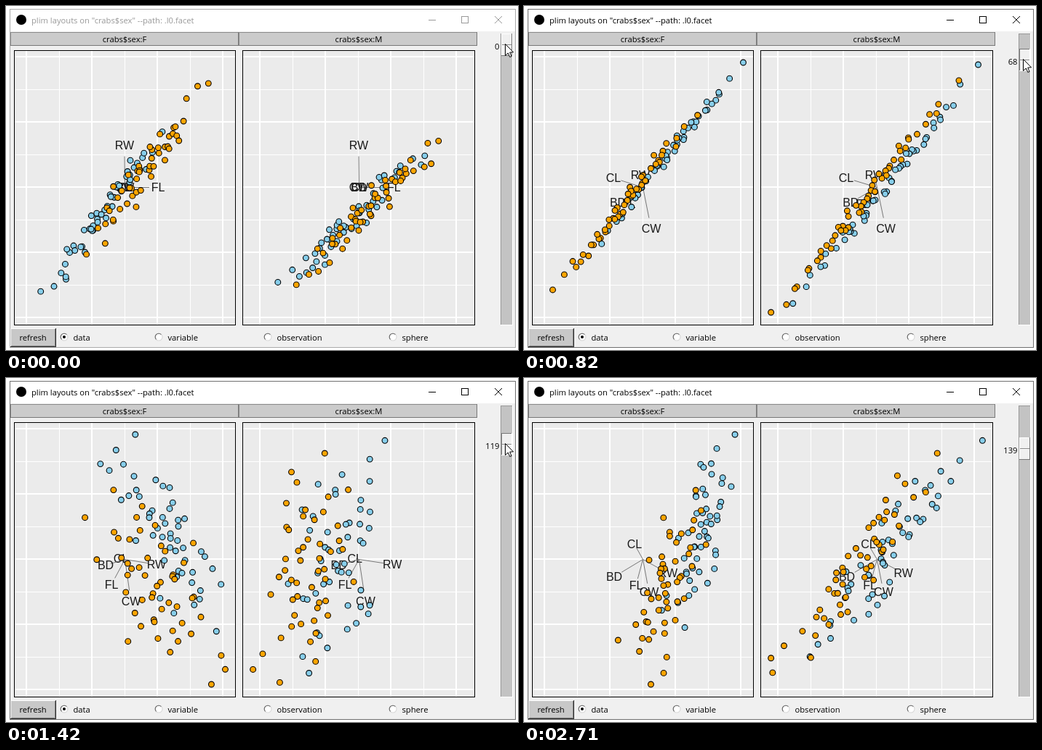
These frames come from a looping animation (704x475 px, 3.11 s). An HTML page with a canvas:

```html
<!DOCTYPE html>
<html lang="en">
<head>
<meta charset="utf-8">
<title>Scatterplot tour</title>
<style>
html, body { margin: 0; width: 100%; height: 100%; overflow: hidden; background: #fff; }
canvas { display: block; width: 704px; height: 475px; }
</style>
</head>
<body>
<canvas id="stage" width="704" height="475"></canvas>
<script>
const ctx = document.getElementById('stage').getContext('2d');
const LOOP = 3110;
const UI_FONT = '11.2px "Open Sans", sans-serif';
const AXIS_FONT = '16px "Liberation Sans", Arial, sans-serif';
const BLUE = '#87ceeb', ORANGE = '#ffa500';

// The screen refreshes only at these moments; the drag runs through a few key points
const TICKS = [0, 120, 240, 360, 510, 670, 820, 940, 1060, 1180, 1300, 1420, 1540,
  1820, 1940, 2060, 2180, 2300, 2440, 2560, 2710];
const DRAG = [[120, 0], [360, 19], [510, 50], [820, 68], [1300, 101], [1420, 119], [1820, 126], [2300, 139]];
const CURSOR_EXIT = [[2300, 677, 311], [2560, 699, 468]];

// Tour of projections: slider value, then the x, y label offset of each variable.
// The same vectors project the measurements.
const VARIABLES = ['FL', 'RW', 'CL', 'CW', 'BD'];
const TOUR = [
  [0, 46, 0, 0, -58, 0, 0, 0, 0, 0, 0],
  [19, 43, 4, -3, -61, -24, -12, -5, 17, -24, 25],
  [68, -19, 23, -3, -17, -40, -13, 12, 57, -34, 21],
  [84, -30, 26, 13, -1, -31, -4, 17, 62, -29, 11],
  [119, -18, 35, 44, 7, -5, -1, 9, 58, -26, 8],
  [139, -9, 36, 35, 19, -11, -21, 9, 45, -39, 24]
];

// Crab measurements in mm: mean per species, growth per unit of size, individual variation
const VARIATION = [0.35, 0.5, 0.4, 0.4, 0.3];
const PANELS = [
  { title: 'crabs$sex:F', x: 11, width: 305, headX: 6, headWidth: 314,
    centre: 163, gridCentre: 163, stretch: 1, growth: [2.75, 2.3, 5.85, 6.6, 2.6],
    means: { [BLUE]: [13.3, 12.1, 28.1, 32.6, 11.8], [ORANGE]: [17.6, 14.8, 34.6, 39, 15.6] } },
  { title: 'crabs$sex:M', x: 325, width: 320, headX: 320, headWidth: 328,
    centre: 485, gridCentre: 484, stretch: 1.05, growth: [3.3, 2.05, 7.5, 8.3, 3.3],
    means: { [BLUE]: [14.8, 11.7, 32, 36.8, 13.4], [ORANGE]: [16.6, 12.3, 33.7, 37.2, 15.3] } }
];

let seed = 11;
const random = () => (seed = (seed * 1664525 + 1013904223) % 4294967296) / 4294967296;
const bell = () => (random() + random() + random() - 1.5) * 2;
const crabs = PANELS.flatMap(panel => Object.entries(panel.means).flatMap(([color, mean]) =>
  Array.from({ length: 50 }, (_, i) => {
    const p = (i + 0.5) / 50;
    const size = 3.15 * (p ** 0.25 - (1 - p) ** 0.25); // bell-shaped quantile with short tails
    const sizes = mean.map((m, j) => m + panel.growth[j] * size + VARIATION[j] * bell());
    return { panel, color, sizes };
  })));

const extent = list => [Math.min(...list), Math.max(...list)];

// Bring every variable to the range 0..1
VARIABLES.forEach((_, j) => {
  const [low, high] = extent(crabs.map(crab => crab.sizes[j]));
  crabs.forEach(crab => crab.sizes[j] = (crab.sizes[j] - low) / (high - low));
});

// Linear interpolation between rows whose first entry is the key
function along(rows, key) {
  const i = Math.max(1, rows.findIndex(row => row[0] >= key));
  const [a, b] = key > rows.at(-1)[0] ? [rows.at(-1), rows.at(-1)] : [rows[i - 1], rows[i]];
  const k = a === b ? 0 : Math.max(0, (key - a[0]) / (b[0] - a[0]));
  return a.slice(1).map((n, j) => n + (b[j + 1] - n) * k);
}

// Both panels share one scale, fitted to the widest spread of the projected points
function project(offsets, zoom) {
  const raw = axis => crabs.map(({ sizes }) =>
    sizes.reduce((sum, s, j) => sum + s * offsets[2 * j + axis], 0));
  const fit = (list, span) => {
    const [low, high] = extent(list);
    return list.map(n => ((n - low) / (high - low) - 0.5) * span * zoom);
  };
  const xs = fit(raw(0), 305), ys = fit(raw(1), 380);
  return crabs.map(({ panel, color }, i) =>
    ({ panel, color, x: panel.centre + xs[i] * panel.stretch, y: 250.5 + ys[i] }));
}

function rect(x, y, w, h, color) {
  ctx.fillStyle = color;
  ctx.fillRect(x, y, w, h);
}

function line(color, width, ...points) {
  ctx.beginPath();
  points.forEach(([x, y]) => ctx.lineTo(x, y));
  ctx.strokeStyle = color;
  ctx.lineWidth = width;
  ctx.stroke();
}

function text(str, x, y, align = 'left', color = '#000', font = UI_FONT) {
  ctx.font = font;
  ctx.textAlign = align;
  ctx.fillStyle = color;
  ctx.fillText(str, x, y);
}

function disc(x, y, r, fill, stroke) {
  ctx.beginPath();
  ctx.arc(x, y, r, 0, 7);
  ctx.fillStyle = fill;
  ctx.fill();
  if (!stroke) return;
  ctx.strokeStyle = stroke;
  ctx.lineWidth = 1.1;
  ctx.stroke();
}

function bevel(x, y, w, h, fill, topLeft, bottomRight) {
  rect(x, y, w, h, bottomRight);
  rect(x, y, w - 1, h - 1, topLeft);
  rect(x + 1, y + 1, w - 2, h - 2, fill);
}

function drawWindow(active) {
  rect(0, 0, 704, 475, '#fff');
  rect(5, 4, 696, 468, active ? '#707070' : '#aaa');
  rect(6, 5, 694, 466, '#f0f0f0');
  rect(6, 5, 694, 30, '#fff');
  const ink = active ? '#000' : '#999';
  disc(21, 19, 7, '#000');
  text('plim layouts on "crabs$sex" --path: .l0.facet', 35, 24, 'left', ink);
  line(ink, 1, [581, 19.5], [591, 19.5]);
  ctx.strokeRect(626.5, 14.5, 9, 9);
  line(ink, 1, [672, 14], [682, 24]);
  line(ink, 1, [682, 14], [672, 24]);
}

function drawControls() {
  bevel(6, 445, 63, 26, '#c8c8c8', '#fff', '#333');
  line('#777', 1, [7, 469.5], [67.5, 469.5], [67.5, 446]);
  text('refresh', 37, 462, 'center');
  [['data', 80], ['variable', 210], ['observation', 360], ['sphere', 532]].forEach(([label, x], i) => {
    disc(x, 457, 5, '#fff', '#d8d8d8');
    ctx.beginPath();
    ctx.arc(x, 457, 4.8, Math.PI * 0.75, Math.PI * 1.75);
    ctx.strokeStyle = '#666';
    ctx.stroke();
    if (i === 0) disc(x, 457, 2, '#000');
    text(label, x + 12.5, 462);
  });
}

function drawGrid(panel) {
  rect(panel.x, 61, panel.width, 380, '#ebebeb');
  for (let i = -4; i <= 4; i++) {
    const [xWidth, yWidth] = i % 2 ? [2, 1] : [1, 2];
    const x = panel.gridCentre + i * 45 + xWidth % 2 / 2;
    const y = 250 + i * 45 + yWidth % 2 / 2;
    line('#fff', xWidth, [x, 61], [x, 441]);
    line('#fff', yWidth, [panel.x, y], [panel.x + panel.width, y]);
  }
}

function drawPanel(panel, offsets, dots) {
  bevel(panel.headX, 36, panel.headWidth, 19, '#cbcbcb', '#8a8a8a', '#777');
  text(panel.title, panel.centre, 50, 'center');
  ctx.save();
  ctx.beginPath();
  ctx.rect(panel.x, 61, panel.width, 380);
  ctx.clip();
  drawGrid(panel);
  VARIABLES.forEach((name, i) => {
    const dx = offsets[2 * i] * panel.stretch, dy = offsets[2 * i + 1];
    line('#777', 1, [panel.centre + 0.5, 250.5], [panel.centre + dx * 0.74, 250.5 + dy * 0.74]);
    text(name, panel.centre + dx, 256 + dy, 'center', '#1a1a1a', AXIS_FONT);
  });
  dots.filter(dot => dot.panel === panel).forEach(({ x, y, color }) => disc(x, y, 3.9, color, '#000'));
  ctx.restore();
  ctx.strokeStyle = '#000';
  ctx.lineWidth = 1;
  ctx.strokeRect(panel.x + 0.5, 61.5, panel.width - 1, 379);
}

function drawSlider(value, pressed) {
  const y = Math.round(38 + value * 0.316);
  bevel(680, 38, 17, 403, '#c3c3c3', '#999', '#fff');
  bevel(681, y, 15, 31, '#f0f0f0', pressed ? '#777' : '#fff', pressed ? '#fff' : '#777');
  line('#888', 1, [682, y + 15.5], [695, y + 15.5]);
  line('#fff', 1, [682, y + 16.5], [695, y + 16.5]);
  text(value, 678.5, y + 22, 'right');
}

function drawCursor(x, y) {
  ctx.save();
  ctx.translate(Math.round(x) + 0.5, Math.round(y) - 0.5);
  ctx.beginPath();
  [[0, 0], [0, 16], [3.8, 12.5], [6.3, 18], [8.6, 17], [6.2, 11.6], [11, 11.3]]
    .forEach(([px, py]) => ctx.lineTo(px, py));
  ctx.closePath();
  ctx.fillStyle = '#fff';
  ctx.fill();
  ctx.strokeStyle = '#000';
  ctx.lineWidth = 1;
  ctx.stroke();
  ctx.restore();
}

function draw(time) {
  const t = TICKS.findLast(tick => tick <= time);
  const value = Math.round(along(DRAG, t)[0]);
  const offsets = along(TOUR, value);
  const dots = project(offsets, value ? 0.908 : 0.756);
  const dragging = t >= 120 && t < 2300;
  drawWindow(t >= 120);
  drawControls();
  PANELS.forEach(panel => drawPanel(panel, offsets, dots));
  drawSlider(value, dragging);
  if (t < 2300) drawCursor(686, 53 + value * 0.316);
  else if (t < 2710) drawCursor(...along(CURSOR_EXIT, t));
}

function tick() {
  draw(performance.now() % LOOP);
  requestAnimationFrame(tick);
}
tick();
</script>
</body>
</html>
```
